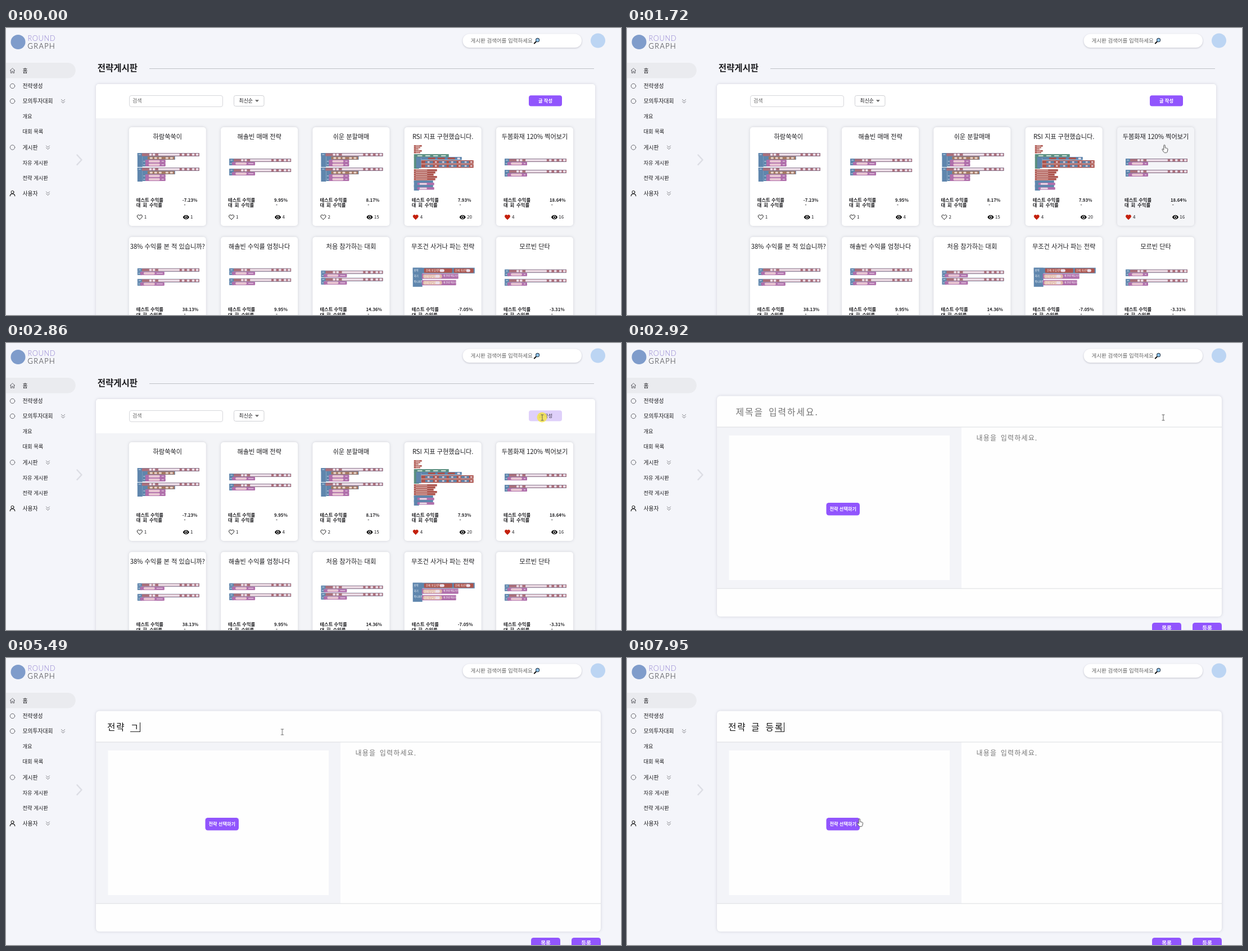
These frames come from a looping animation (1094 px wide and 512 px high, 8 s). An HTML page:

```html
<!DOCTYPE html>
<html lang="ko">
<head>
<meta charset="utf-8">
<title>전략게시판</title>
<style>
html, body { margin: 0; width: 1094px; height: 512px; overflow: hidden; background: #f4f5fa; }
body { position: relative; font-family: "Noto Sans CJK KR", "Noto Sans KR", sans-serif; }
svg, .layer { position: absolute; left: 0; top: 0; width: 1094px; height: 512px; }
text { fill: #1d1d20; }
.mid { text-anchor: middle; }
.semi { font-weight: 500; }
.bold { font-weight: 700; }
.grey { fill: #666; }
.white { fill: #fff; }
.logo { font-family: Lato, Inter, sans-serif; font-weight: 300; letter-spacing: .6px; }
.violet { fill: #8f7fd0; }
.wide { letter-spacing: 1.4px; }
.line { fill: none; stroke: #5a5a60; stroke-linecap: round; stroke-linejoin: round; }
.dark { stroke: #111; }
.faint { stroke: #dcdde4; }
.lift { filter: drop-shadow(0 0 2.5px rgba(70, 75, 95, .2)); }
.bar { filter: drop-shadow(0 1px 1.5px rgba(60, 60, 80, .27)); }
.hint { fill: #757575; font-weight: 300; }
.hint.big { letter-spacing: 1.96px; word-spacing: 2.75px; }
.hint.small { letter-spacing: 1.16px; word-spacing: 2.25px; }
.spread { word-spacing: 1.6px; }

.list, .post, .ask, .done::before, .comp::before, .caret, .arrow, .hand, .beam, .press {
  animation: 8s step-end infinite;
}
.list { animation-name: list; }
.post { animation-name: post; }
.ask { animation-name: ask; }
@keyframes list { 0% { opacity: 1 } 36.5%, 100% { opacity: 0 } }
@keyframes post { 0% { opacity: 0 } 36.5%, 100% { opacity: 1 } }
@keyframes ask { 0% { opacity: 1 } 58.875%, 100% { opacity: 0 } }

.hot { animation: hot 8s linear infinite; }
@keyframes hot { 0%, 19.1%, 24%, 100% { fill: #fff } 20.4%, 22.8% { fill: #f4f5f8 } }
.write { animation: write 8s linear infinite; }
.write-label { animation: label 8s linear infinite; }
@keyframes write { 0%, 27% { fill: #9155fd } 30.75%, 100% { fill: #dfd0fa } }
@keyframes label { 0%, 27% { fill: #fff } 30.75%, 100% { fill: #6f6780 } }

.typed {
  position: absolute; left: 180px; top: 115px; height: 17px; display: flex;
  font-size: 15.6px; font-weight: 300; line-height: 15px; color: #111;
  letter-spacing: 1.85px; word-spacing: 2.75px; white-space: pre;
}
.comp { box-shadow: inset 0 -1px #222; }
.caret { width: 1px; background: #111; animation-name: caret; }
.done::before { content: ""; animation-name: done; }
.comp::before { content: ""; animation-name: comp; }
@keyframes caret {
  0%, 54.75%, 91% { opacity: 0 }
  48.125%, 58.875%, 97.625%, 100% { opacity: 1 }
}
@keyframes done {
  0% { content: "" }
  62.06% { content: "전" }
  65.19% { content: "전략" }
  66.25% { content: "전략 " }
  72% { content: "전략 글 " }
  80.25%, 100% { content: "전략 글 등" }
}
@keyframes comp {
  0% { content: "" }
  58.875% { content: "ㅈ" }
  59.94% { content: "저" }
  61% { content: "전" }
  62.06% { content: "ㄹ" }
  63.13% { content: "랴" }
  64.13% { content: "략" }
  65.19% { content: "" }
  68.625% { content: "ㄱ" }
  69.75% { content: "그" }
  70.875% { content: "글" }
  72% { content: "" }
  77% { content: "ㄷ" }
  78.125% { content: "드" }
  79.125% { content: "등" }
  80.25% { content: "ㄹ" }
  82% { content: "로" }
  84.375%, 100% { content: "록" }
}

.pointer { animation: move 8s linear infinite; }
@keyframes move {
  0%, 13.36% { transform: translate(1110px, 530px) }
  13.375%, 16.6% { transform: translate(1081px, 493px) }
  19.1% { transform: translate(1003px, 330px) }
  21.5% { transform: translate(956px, 209px) }
  23.25% { transform: translate(952px, 165px) }
  26.6%, 40.6% { transform: translate(954px, 133px) }
  43.1% { transform: translate(840px, 158px) }
  45% { transform: translate(680px, 164px) }
  48.1%, 91.9% { transform: translate(491.5px, 132px) }
  93.75% { transform: translate(503px, 165px) }
  95.6% { transform: translate(490px, 215px) }
  97.5% { transform: translate(445px, 265px) }
  99.37%, 100% { transform: translate(413.5px, 287px) }
}
.arrow { animation-name: arrow; }
.hand { animation-name: hand; }
.beam { animation-name: beam; }
.press { animation-name: press; }
@keyframes arrow { 0%, 22.8%, 92.9% { opacity: 1 } 19.1%, 25.9%, 99.2%, 100% { opacity: 0 } }
@keyframes hand { 0%, 22.8%, 35% { opacity: 0 } 19.1%, 25.9%, 99.2%, 100% { opacity: 1 } }
@keyframes beam { 0%, 92.9%, 100% { opacity: 0 } 35% { opacity: 1 } }
@keyframes press { 0%, 36.5%, 50.5%, 100% { opacity: 0 } 33.25%, 48.125% { opacity: 1 } }
</style>
</head>
<body>
<svg id="frame"></svg>
<svg id="list" class="list"></svg>
<div class="layer post">
  <svg id="post"></svg>
  <div class="typed"><span class="done"></span><span class="comp"></span><i class="caret"></i></div>
</div>
<svg>
  <g class="pointer">
    <circle class="press" cx="-.5" cy="-.5" r="9" fill="#f3e54e" fill-opacity=".87"/>
    <path class="arrow" d="M0 0V12l2.8-2.6 1.9 4.3 1.9-.8-1.9-4.2h3.8z" fill="#fff" stroke="#222" stroke-width=".8"/>
    <path class="hand" d="M-1.2 1.2a1.2 1.2 0 0 1 2.4 0V5l3.6 1q1.3.4 1.2 1.8l-.6 3.6q-.3 2-2 2.3H.6q-1 0-1.8-1.2L-4 8.4q-.4-1.2.8-1.3.9 0 2 1.6z" fill="#fff" stroke="#222" stroke-width=".8"/>
    <path class="beam" d="M-2.5-5H2.5M0-5V5M-2.5 5H2.5" fill="none" stroke="#555" stroke-width=".9"/>
  </g>
</svg>
<script>
const rect = (x, y, w, h, fill, rx = 0, more = '') =>
  `<rect x="${x}" y="${y}" width="${w}" height="${h}" rx="${rx}" fill="${fill}" ${more}/>`;
// y is the optical middle of the line
const text = (x, y, size, str, cls = '') =>
  `<text x="${x}" y="${y + size * .37}" font-size="${size}" class="${cls}">${str}</text>`;
const path = (d, width = .9, cls = '') =>
  `<path class="line ${cls}" d="${d}" stroke-width="${width}"/>`;
const at = (x, y, body, scale = 1) => `<g transform="translate(${x} ${y}) scale(${scale})">${body}</g>`;
const put = (id, parts) => document.getElementById(id).innerHTML = parts.join('');

const PURPLE = '#9155fd', BLUE = '#5f86ad', MAUVE = '#ab707c', PLUM = '#b06fab',
  PALE = '#ecdfe9', RED = '#ad554e', TEAL = '#5a8f80', BROWN = '#a67762';

// Header and sidebar
const fold = (x, y) => path(`M${x - 3} ${y - 3}l3 3 3-3m-6 3.5l3 3 3-3`, .8);
const ring = y => `<circle class="line" cx="11.5" cy="${y}" r="4.2" stroke-width=".9"/>`;
const menu = [['홈', 76], ['전략생성', 103.5], ['모의투자대회', 130.5], ['개요', 158, 1], ['대회 목록', 185, 1],
  ['게시판', 213], ['자유 게시판', 240.5, 1], ['전략 게시판', 267.5, 1], ['사용자', 295]];

put('frame', [
  '<circle cx="21.5" cy="25" r="13" fill="#7f9ccb"/>',
  text(38.5, 18.2, 12.8, 'ROUND', 'logo violet'),
  text(38.5, 31.8, 12.8, 'GRAPH', 'logo wide'),
  rect(812.5, 10.5, 211.5, 24.5, '#fff', 12, 'class="bar"'),
  text(826.5, 22.7, 9.5, '게시판 검색어를 입력하세요', 'grey'),
  path('M943 24.3l-3.2 3.2', 2, 'dark'),
  '<circle cx="945.6" cy="21.5" r="3.1" fill="#8fc6ee" stroke="#35475a" stroke-width="1.1"/>',
  '<circle cx="1053" cy="22.5" r="13" fill="#bcd5f3"/>',
  '<path d="M0 62H110a13.75 13.75 0 0 1 0 27.5H0z" fill="#eaebef"/>',
  ...menu.map(([s, y, sub]) => text(29.5, y, sub ? 9.3 : 9.8, s)),
  path('M7.3 75.8L11.5 71.8 15.7 75.8M8.4 75V80.3H10.4V77.2H12.6V80.3H14.6V75'),
  ring(103.5), ring(130.5), ring(213),
  '<circle class="line dark" cx="11.5" cy="292.8" r="2.5"/>',
  path('M7.2 299.8q.3-4 4.3-4.2 4 .2 4.3 4.2', 1.1, 'dark'),
  fold(101.5, 130.5), fold(74.5, 213), fold(74.5, 295),
  path('M126.5 226.5l8 8.7-8 8.7', 2.4, 'faint'),
]);

// Block programs shown as thumbnails
const chips = (y, h, fill, xs, w) => xs.map(x => rect(x, y, w, h, fill, 1)).join('');
const cond = y => rect(0, y, 110, 6, BLUE) + rect(8, y + .4, 102, 5.2, MAUVE) +
  rect(37, y + 1.1, 38, 3.6, PALE, 1) + chips(y + 1.1, 3.6, PALE, [21, 27, 79, 88, 97, 104], 4.5) +
  rect(2, y + 2.3, 4, 1, '#d5e0ec');
const act = (y, w = 41) => rect(0, y, 8, 6, BLUE) + rect(5, y, w, 6, PLUM, 1) +
  rect(11, y + .8, 20, 4.2, '#e8c6d2', 2) + rect(34, y + 2.2, w - 32, 1.3, '#e6d0e4') +
  rect(1.5, y + 2.4, 3, 1, '#d5e0ec');
const pair = (gap = 18, w) => cond(0) + act(6, w) + cond(gap) + act(gap + 6, w);
const nested = () => [0, 26].map(y =>
  rect(0, y, 9, 25, BLUE) + cond(y) + rect(9, y + 6, 58, 6, BLUE) + rect(18, y + 6.4, 48, 5.2, BROWN) +
  chips(y + 7.4, 3, '#ecd9cf', [22, 30, 38, 50, 58], 5) +
  at(9, 0, act(y + 12, 36) + act(y + 18, 36))).join('');
const stack = (y, n, step, w) => Array.from({ length: n }, (_, i) =>
  rect(0, y + i * step, w - i % 3 * 3, step - .4, RED) +
  rect(3, y + i * step + 1, w * .5, 1, '#e6cbc7')).join('');
const tall = () => stack(0, 5, 3, 14) + rect(0, 16, 62, 6, TEAL) + chips(18, 2, '#cfe2db', [6, 20, 34, 48], 9) +
  rect(0, 21, 9, 21, TEAL) + rect(4, 21, 9, 20, BLUE) + rect(13, 21, 72, 5.4, BLUE) +
  chips(22, 3.2, RED, [25, 42, 60], 13) + rect(77, 22.2, 5, 3, PALE, 1) +
  [27, 34].map(y => rect(13, y, 93, 6.4, RED) + chips(y + 1.2, 4, BLUE, [20, 44, 62, 84], 14) +
    chips(y + 1.9, 2.4, PALE, [24, 37, 50, 66, 79, 90, 100], 4)).join('') +
  stack(43, 5, 4, 41) + rect(0, 63, 9, 18, BLUE) +
  [63, 71].map(y => rect(0, y, 34, 4, BLUE) + rect(6, y + 4, 30, 4.4, PLUM, 1) +
    rect(10, y + 4.8, 13, 2.8, PALE, 1)).join('');
const large = () => rect(0, 0, 110, 10, BLUE) + rect(0, 0, 17, 34, BLUE) +
  rect(20, 1, 50, 8, RED, 1) + rect(73, 1, 35, 8, RED, 1) +
  text(23, 5, 4.6, '현재 보유량이', 'white') + rect(48, 2.5, 8, 5, PALE, 2) +
  text(75, 5, 4.6, '현재 자산이', 'white') + rect(95, 2.5, 7, 5, PALE, 2) +
  text(2, 5, 4.4, '만약', 'white') + text(2, 14.5, 4.4, '하기', 'white') + text(2, 25, 4.4, '아니라면', 'white') +
  [[10.5, 65, '에 전량 매도하기'], [22, 61, '에 전량 매수하기']].map(([y, w, s]) =>
    rect(16, y, w, 9.4, PLUM, 1) + rect(18, y + 1.2, 34, 7, '#e0b9a8', 3) +
    text(20, y + 4.7, 4.4, '현재 보유량', 'white') + rect(40, y + 2.2, 8, 5, PALE, 2) +
    text(54, y + 4.7, 4, s, 'white')).join('');

// Cards
const heart = 'M16.5 4C14.76 4 13.09 4.81 12 6.09 10.91 4.81 9.24 4 7.5 4 4.42 4 3 6.42 3 8.5c0 3.78 3.4 6.86 9 11.85 5.6-4.99 9-8.07 9-11.85C21 6.42 19.58 4 16.5 4z';
const eye = '<path d="M12 4.5C7 4.5 2.73 7.61 1 12c1.73 4.39 6 7.5 11 7.5s9.27-3.11 11-7.5c-1.73-4.39-6-7.5-11-7.5z"/><circle cx="12" cy="12" r="5" fill="#fff"/><circle cx="12" cy="12" r="3"/>';
const stats = (likes, views, red) => {
  const hx = red ? 14 : 13, ex = red ? 98 : 96;
  const paint = red ? 'fill="#c4200c" stroke="#c4200c"' : 'fill="none" stroke="#111"';
  return at(hx, 154.5, `<path d="${heart}" ${paint} stroke-width="2"/>`, .5) +
    text(hx + 14, 159.6, 8, likes) + at(ex - .5, 154.5, eye, .5) + text(ex + 13.3, 159.6, 8, views);
};
const cards = [
  { name: '하람쑥쑥이', gain: '-7.23%', art: nested(), y: 46, info: [1, 1] },
  { name: '해솔빈 매매 전략', gain: '9.95%', art: pair(), y: 56, info: [1, 4] },
  { name: '쉬운 분할매매', gain: '8.17%', art: nested(), y: 46, info: [2, 15] },
  { name: 'RSI 지표 구현했습니다.', gain: '7.93%', art: at(2, 0, tall()), y: 32, info: [4, 20, 1] },
  { name: '두봄화재 120% 찍어보기', gain: '18.64%', art: pair(20, 35), y: 56, info: [4, 16, 1], cls: 'hot' },
  { name: '38% 수익률 본 적 있습니까?', gain: '38.13%', art: pair(19, 43), y: 56 },
  { name: '해솔빈 수익률 엄청나다', gain: '9.95%', art: pair(), y: 56 },
  { name: '처음 참가하는 대회', gain: '14.36%', art: pair(13), y: 60 },
  { name: '무조건 사거나 파는 전략', gain: '-7.05%', art: large(), y: 55 },
  { name: '모르빈 단타', gain: '-3.31%', art: pair(17, 35), y: 58 },
];
const card = (c, i) => at(218.8 + i % 5 * 163.3, 177 + (i > 4 ? 195.7 : 0),
  rect(0, 0, 137, 176, '#fff', 5, `class="lift ${c.cls || ''}"`) +
  text(68.5, 16.8, 11.2, c.name, 'mid semi') + at(15, c.y, c.art) +
  text(13, 129.7, 8.3, '테스트 수익률', 'bold') + text(13, 138.8, 8.3, '대 회 수익률', 'bold spread') +
  text(95, 129.7, 7.8, c.gain, 'bold') + text(99.3, 138.8, 8, '-', 'bold mid') +
  (c.info ? stats(...c.info) : ''));

put('list', [
  text(162.7, 71.7, 15.5, '전략게시판', 'bold'),
  rect(255, 72, 791, 1, '#bfc1c7'),
  rect(160, 100, 888, 440, '#f3f4f7', 5, 'class="lift"'),
  '<path d="M160 161V105a5 5 0 0 1 5-5H1043a5 5 0 0 1 5 5V161z" fill="#fff"/>',
  rect(219.5, 120.5, 166, 20, '#fff', 3.5, 'stroke="#d6d7db"'),
  text(225, 130, 9, '검색', 'grey'),
  rect(405.5, 120.5, 53.5, 19, '#fff', 3, 'stroke="#cfd0d4"'),
  text(414.5, 130, 8.9, '최신순'),
  '<path d="M443 128.3h7l-3.5 3.6z" fill="#666"/>',
  rect(930, 120.2, 59, 19.4, PURPLE, 4, 'class="write"'),
  text(959.5, 130, 8.2, '글 작성', 'mid bold write-label'),
  ...cards.map(card),
]);

// Post editor
const button = (x, y, w, h, size, s) =>
  rect(x, y, w, h, PURPLE, 4.5) + text(x + w / 2, y + (h > 21 ? 11.3 : 9.2), size, s, 'mid bold white');
put('post', [
  rect(160, 94.5, 898, 393.5, '#fefefe', 6, 'class="lift"'),
  rect(160, 150, 435, 288, '#f3f4f8'),
  rect(160, 149.5, 898, 1, '#dcdde1'),
  rect(160, 437.5, 898, 1, '#dcdde1'),
  rect(181.5, 165, 392.5, 258, '#fefefe'),
  `<g class="ask">${text(193.5, 123.5, 15.8, '제목을 입력하세요.', 'hint big')}</g>`,
  text(621.5, 169.5, 12, '내용을 입력하세요.', 'hint small'),
  button(354.5, 285, 59.5, 22.5, 8.2, '전략 선택하기'),
  button(934, 499, 52, 20, 9.6, '목록'),
  button(1006, 499, 52, 20, 9.6, '등록'),
]);
</script>
</body>
</html>
```
